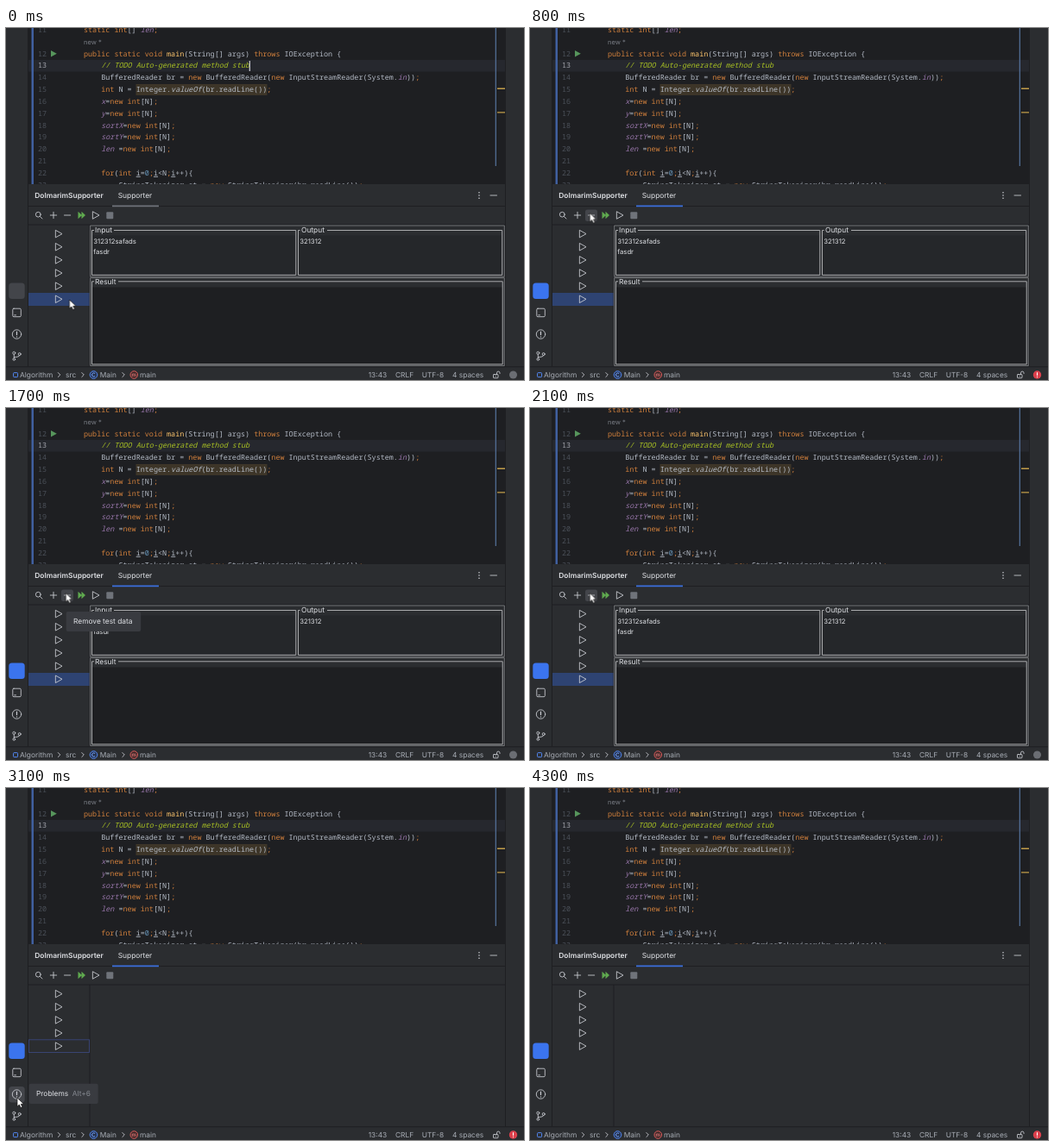
Animation of 600x408 px, one loop 4.4 s. Source, as an HTML page:

```html
<!DOCTYPE html>
<html lang="en">
<head>
<meta charset="utf-8">
<title>Removing a test case</title>
<style>
html, body { margin: 0; width: 100%; height: 100%; overflow: hidden; background: #2b2d30; }
svg { display: block; width: 600px; height: 408px; }
text { font: 8.4px Inter, sans-serif; fill: #dfe1e5; white-space: pre; text-rendering: geometricPrecision; }
.code text { font: 8.43px "Noto Sans Mono", "DejaVu Sans Mono", monospace; fill: #b4bbc6; }
.code .number { fill: #4b5059; text-anchor: end; }
.code .current { fill: #a1a3ab; }
.keyword { fill: #cf7f3c; }
.field { fill: #9876aa; font-style: italic; }
.method { fill: #ffc66d; }
.static { font-style: italic; }
.digit { fill: #6897bb; }
.local { text-decoration: underline; }
.code .todo { fill: #a8c023; font-style: italic; }
text.title { font-weight: 600; }
text.area { font-size: 7.75px; }
text.hint { font-size: 7.5px; fill: #787c84; }
text.shortcut { fill: #868a91; }
.status text { fill: #a8adb5; }
.icon { fill: none; stroke: #ced0d6; stroke-width: .85; stroke-linecap: round; stroke-linejoin: round; }
.edge { fill: none; stroke: #1e1f22; stroke-width: 1; }
.box { fill: none; stroke: #aaabad; stroke-width: 1; }
.frame { fill: none; stroke: #85878a; stroke-width: .8; }
.panel { fill: #2b2d30; }
.dark { fill: #1e1f22; }
.field-area { fill: #25272a; }
.hover { fill: #43454a; }
.tip { fill: #393b40; }

/* One loop is 4400 ms; 100 ms is about 2.27 %. */
.timed { animation: 4400ms step-end infinite; }
.caret { animation-name: caret; }
.tool { animation-name: tool; }
.underline { animation-name: underline; }
.row { animation-name: row; }
.ring { animation-name: ring; }
.minus-hover { animation-name: minus-hover; }
.remove-tip { animation-name: remove-tip; }
.problems { animation-name: problems; }
.error { animation-name: error; }
.pointer { animation-name: pointer; }
@keyframes caret { 0% { opacity: 1 } 2.2%, 100% { opacity: 0 } }
@keyframes tool { 0% { fill: #43454a } 2.2%, 100% { fill: #3b74ee } }
@keyframes underline { 0% { fill: #6f737a } 2.2%, 100% { fill: #3b6fdc } }
@keyframes row { 0% { opacity: 1 } 54.5%, 100% { opacity: 0 } }
@keyframes ring { 0% { opacity: 0 } 54.5% { opacity: 1 } 88.6%, 100% { opacity: 0 } }
@keyframes minus-hover { 0% { opacity: 0 } 15.9% { opacity: 1 } 61.3%, 100% { opacity: 0 } }
@keyframes remove-tip { 0% { opacity: 0 } 27.2% { opacity: 1 } 43.1%, 100% { opacity: 0 } }
@keyframes problems { 0% { opacity: 0 } 70.4% { opacity: 1 } 79.5%, 100% { opacity: 0 } }
@keyframes error {
  0% { opacity: 0 } 9% { opacity: 1 } 25% { opacity: 0 }
  54.5% { opacity: 1 } 77.2% { opacity: 0 } 97.7%, 100% { opacity: 1 }
}
@keyframes pointer {
  0% { transform: translate(73.5px, 315px) }
  4.5% { transform: translate(73.5px, 315px); animation-timing-function: steps(5) }
  15.9% { transform: translate(69.3px, 214.5px) }
  59% { transform: translate(69.3px, 214.5px); animation-timing-function: steps(5) }
  70.4% { transform: translate(13px, 359px) }
  77.2% { transform: translate(13px, 359px); animation-timing-function: steps(2) }
  81.8%, 100% { transform: translate(16px, 420px) }
}
</style>
</head>
<body>
<svg viewBox="0 0 600 408">
  <defs>
    <path id="play" class="icon" d="M-3.3 -4.1 L4 0 L-3.3 4.1Z"/>
    <path id="chevron" class="icon" d="M-1.2 -2.5 L1.3 0 L-1.2 2.5"/>
    <clipPath id="editor"><path d="M26 0H578V181H26Z"/></clipPath>
  </defs>
  <path class="panel" d="M0 0H600V408H0Z"/>

  <g clip-path="url(#editor)">
    <path class="dark" d="M26 0H578V181H26Z"/>
    <path fill="#26282e" d="M26 37H578V50.500H26Z"/>
    <path fill="#3d3528" d="M150.500 65H302.500V78H150.500Z"/>
    <path fill="#40609f" d="M29.500 0H32V181H29.500Z"/>
    <path fill="#56749f" d="M566.700 0H567.900V160H566.700Z"/>
    <path fill="#c29e4a" d="M569 69.600H578V70.900H569ZM569 97.300H578V98.600H569Z"/>
    <path fill="#57965c" d="M52 26L58.800 29.800L52 33.600Z"/>
    <text class="hint" x="90" y="19">new *</text>
    <g class="code" id="code"></g>
    <path class="timed caret" fill="#ced0d6" d="M281.700 38H282.900V50H281.700Z"/>
  </g>

  <path class="edge" d="M25.500 0V392.500M578.500 0V392.500M26 206.500H578M26 228H578M97 228V392M0 392.700H600"/>
  <text class="title" x="33.300" y="197.300">DolmarimSupporter</text>
  <text x="129.700" y="197.300">Supporter</text>
  <path class="timed underline" d="M123 205.500H177V207.300H123Z"/>
  <g fill="#ced0d6"><circle cx="548" cy="190.800" r=".8"/><circle cx="548" cy="194" r=".8"/><circle cx="548" cy="197.200" r=".8"/></g>
  <path class="icon" d="M561 194H568.500"/>

  <rect class="timed minus-hover hover" x="64" y="210.500" width="14" height="13.500" rx="2.500"/>
  <g class="icon">
    <circle cx="37.300" cy="216.200" r="2.900"/>
    <path d="M39.500 218.500L42 221M51.300 217H58.700M55 213.300V220.700M67.500 217H74.700"/>
  </g>
  <path fill="#5fa94f" d="M83.500 212.800L88 217L83.500 221.200ZM87.500 212.800L92 217L87.500 221.200Z"/>
  <use href="#play" x="104" y="217"/>
  <rect x="116.300" y="213.200" width="8" height="8" rx="1" fill="#6f737a"/>

  <g id="rows"></g>
  <rect class="timed ring" x="26.500" y="291.800" width="70" height="14.700" fill="none" stroke="#3b477a" stroke-width=".9"/>
  <g class="timed row">
    <path fill="#2e4372" d="M26 307H96.500V322H26Z"/>
    <use href="#play" x="61" y="314.300"/>
    <path class="field-area" d="M100 240.500H335.500V286H100ZM339 240.500H574.500V286H339Z"/>
    <path class="dark" d="M100 300.500H575V390H100Z"/>
    <path class="frame" d="M97.600 229H577.300V288.300H97.600ZM97.600 289.700H577.300V391.500H97.600Z"/>
    <path class="box" d="M102 234.500H99.500V286.300H335.800V234.500H125M340.500 234.500H338.500V286.300H574.700V234.500H372M102 293.800H99.500V389.800H575.200V293.800H130"/>
    <text x="103" y="237.300">Input</text>
    <text x="342" y="237.300">Output</text>
    <text x="103" y="296.600">Result</text>
    <text class="area" x="101.200" y="250.200">312312safads</text>
    <text class="area" x="101.200" y="262.200">fasdr</text>
    <text class="area" x="340.200" y="250.200">321312</text>
  </g>

  <rect class="timed tool" x="3.300" y="295.500" width="18.400" height="18.500" rx="3.500"/>
  <rect class="timed problems hover" x="3.300" y="346" width="18.400" height="18.500" rx="3.500"/>
  <g class="icon">
    <rect x="7.800" y="325.200" width="9.500" height="9.500" rx="1.200"/>
    <path d="M9.700 332.800H11.500"/>
    <circle cx="12.500" cy="355" r="5.200"/>
    <path d="M12.500 352V355.600M12.500 357.800V357.900" stroke-width="1.200"/>
    <circle cx="9.300" cy="376.700" r="1.500"/>
    <circle cx="15.700" cy="378" r="1.500"/>
    <circle cx="9.300" cy="384" r="1.300"/>
    <path d="M9.300 378.300V382.600M15.700 379.600Q15.500 381.500 9.500 381.500"/>
  </g>

  <g class="status">
    <rect x="8.600" y="399.600" width="5" height="5" rx=".8" fill="none" stroke="#548af7"/>
    <text x="16" y="405">Algorithm</text>
    <text x="69" y="405">src</text>
    <text x="108.700" y="405">Main</text>
    <text x="155" y="405">main</text>
    <use href="#chevron" x="61.500" y="402"/>
    <use href="#chevron" x="89" y="402"/>
    <use href="#chevron" x="136" y="402"/>
    <circle cx="101.500" cy="402" r="4.300" fill="#25324d" stroke="#548af7"/>
    <path d="M103.200 400.600A2.100 2.100 0 1 0 103.200 403.400" fill="none" stroke="#78a5ff"/>
    <circle cx="148.300" cy="402" r="4.300" fill="#402929" stroke="#db5c5c"/>
    <path d="M146.300 404V400.800M146.300 401.500Q147.300 400 148.300 401.500V404M148.300 401.500Q149.300 400 150.300 401.500V404" fill="none" stroke="#e77d7d" stroke-width=".8"/>
    <text x="419.700" y="405">13:43</text>
    <text x="451" y="405">CRLF</text>
    <text x="481.700" y="405">UTF-8</text>
    <text x="517" y="405">4 spaces</text>
    <g class="icon">
      <rect x="564.500" y="401.500" width="5.500" height="4.200" rx=".7"/>
      <path d="M568.500 401.300V399.800A1.700 1.700 0 0 1 572 399.800V400.500M567.200 403.300V403.700"/>
    </g>
    <circle cx="587.500" cy="402" r="4.500" fill="#6b6e74"/>
    <g class="timed error">
      <circle cx="587.500" cy="402" r="4.700" fill="#dc3f4b"/>
      <path d="M587.500 399.500V402.500M587.500 404.300V404.400" stroke="#fff" stroke-width="1.100" stroke-linecap="round"/>
    </g>
  </g>

  <g class="timed remove-tip">
    <rect class="tip" x="69.700" y="236" width="86.500" height="23" rx="2"/>
    <text x="78" y="250.300">Remove test data</text>
  </g>
  <g class="timed problems">
    <rect class="tip" x="26.700" y="342.700" width="80" height="23.300" rx="2"/>
    <text x="35" y="357.300">Problems</text>
    <text class="shortcut" x="76.800" y="357.300">Alt+6</text>
  </g>
  <g class="timed pointer">
    <path d="M0 0V10.200L2.400 8L4 11.600L5.900 10.800L4.300 7.300H7.500Z" fill="#fff" stroke="#111" stroke-width=".7"/>
  </g>
</svg>
<script>
const FIRST_LINE = 11, INDENT = 5.06;
const source = [
  "static int[] len;",
  "public static void main(String[] args) throws IOException {",
  "    // TODO Auto-generated method stub",
  "    BufferedReader br = new BufferedReader(new InputStreamReader(System.in));",
  "    int N = Integer.valueOf(br.readLine());",
  "    x=new int[N];",
  "    y=new int[N];",
  "    sortX=new int[N];",
  "    sortY=new int[N];",
  "    len =new int[N];",
  "",
  "    for(int i=0;i<N;i++){",
  "        StringTokenizer st = new StringTokenizer(br.readLine());"
];
const rules = {
  todo: "//.*",
  keyword: "\\b(?:static|public|void|int|new|for|throws)\\b|;",
  field: "\\b(?:x|y|sortX|sortY|len|in)\\b",
  method: "\\bmain\\b",
  static: "\\bvalueOf\\b",
  digit: "\\b\\d+\\b",
  local: "\\bi\\b",
  less: "<"
};
const pattern = new RegExp(
  Object.entries(rules).map(([name, rule]) => `(?<${name}>${rule})`).join("|"), "g");

function highlight(line) {
  return line.replace(pattern, (token, ...rest) => {
    const groups = rest[rest.length - 1];
    const name = Object.keys(groups).find(key => groups[key] !== undefined);
    return name === "less" ? "&lt;" : `<tspan class="${name}">${token}</tspan>`;
  });
}

document.getElementById("code").innerHTML = source.map((line, i) => {
  const number = FIRST_LINE + i;
  const y = 18.7 + i * 13.84 - (i ? 0 : 13.5);
  const code = line.trimStart();
  const x = 90 + (line.length - code.length) * INDENT;
  return `<text class="number ${number === 13 ? "current" : ""}" x="47" y="${y}">${number}</text>
    <text x="${x}" y="${y}">${highlight(code)}</text>`;
}).join("");

document.getElementById("rows").innerHTML = Array.from({ length: 5 }, (_, i) =>
  `<use href="#play" x="61" y="${238.6 + i * 15.14}"/>`).join("");
</script>
</body>
</html>
```
